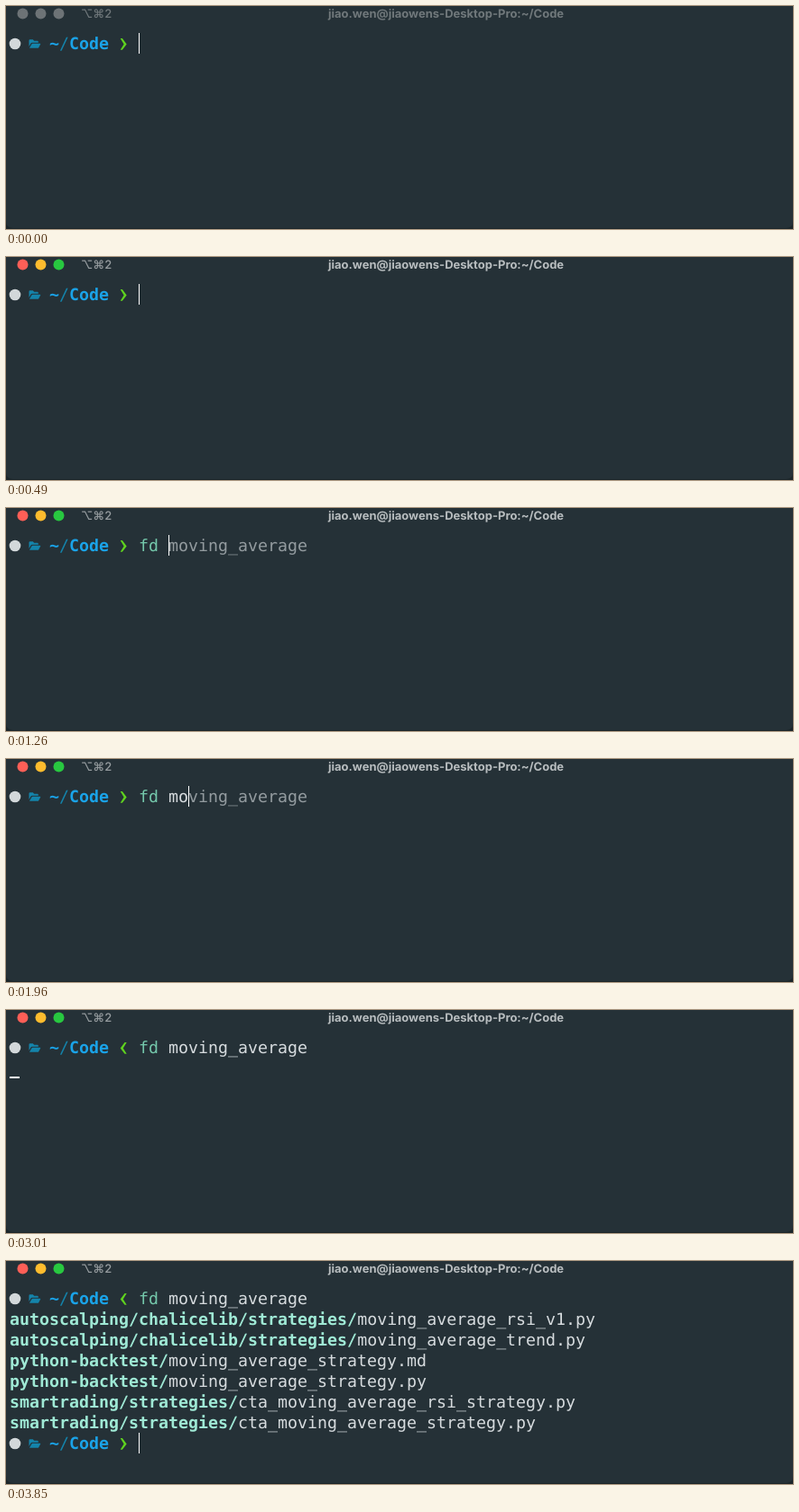
Write an HTML page that moves like this. It is 872 px wide and 248 px high and loops after 5.04 s.

```html
<!DOCTYPE html>
<html lang="en">
<head>
<meta charset="utf-8">
<title>Terminal</title>
<style>
  html, body { margin: 0; width: 100%; height: 100%; overflow: hidden; background: #1b2529; }
  svg { display: block; width: 872px; height: 248px; }
  text { white-space: pre; text-rendering: geometricPrecision; }
  .mono { font: 18.28px "DejaVu Sans Mono", monospace; }
  .bold { font-weight: 700; }
  .bar { font: 700 13px Inter, "DejaVu Sans", sans-serif; }
  .key { font-weight: 500; }
</style>
</head>
<body>
<svg id="stage" viewBox="0 0 872 248"></svg>
<script>
const LOOP = 5040;
const LEFT = 4, CELL = 11.005, TOP = 30, ROW = 23;
const INK = '#d6dbde', HINT = '#939b9f', CMD = '#74c8ab', BAD = '#ec5f67';
const DIR = '#9fe9d5', BLUE = '#1aa3e8', TEAL = '#1484ab', GREEN = '#5fd21f', WHITE = '#fff';
const PAPER = '#253137';
const COMMAND = 'fd moving_average';
const START = 13; // column after the prompt

const RESULTS = [
  ['autoscalping/chalicelib/strategies/', 'moving_average_rsi_v1.py'],
  ['autoscalping/chalicelib/strategies/', 'moving_average_trend.py'],
  ['python-backtest/', 'moving_average_strategy.md'],
  ['python-backtest/', 'moving_average_strategy.py'],
  ['smartrading/strategies/', 'cta_moving_average_rsi_strategy.py'],
  ['smartrading/strategies/', 'cta_moving_average_strategy.py'],
];

// Each step overrides part of the state before it.
const STEPS = [
  { at: 0, active: false, typed: 0, cursor: 'beam', vi: false, run: false, done: false },
  { at: 490, active: true },
  { at: 840, typed: 1 },
  { at: 1050, typed: 2 },
  { at: 1260, typed: 3 },
  { at: 1540, typed: 4 },
  { at: 1890, typed: 5 },
  { at: 2660, cursor: 'block' },
  { at: 2730, cursor: 'beam', typed: COMMAND.length },
  { at: 2940, vi: true },
  { at: 3010, run: true, cursor: 'line' },
  { at: 3080, done: true, cursor: 'beam' },
];

const colX = col => LEFT + col * CELL;
const rowY = row => TOP + row * ROW;
const rect = (x, y, w, h, fill) =>
  `<rect x="${x}" y="${y}" width="${w}" height="${h}" fill="${fill}"/>`;
const dot = (x, y, r, fill) => `<circle cx="${x}" cy="${y}" r="${r}" fill="${fill}"/>`;
const write = (col, row, str, fill, bold) => str &&
  `<text class="mono${bold ? ' bold' : ''}" x="${colX(col)}" y="${rowY(row) + 18}" fill="${fill}">${str}</text>`;

function titleBar(active) {
  const lights = active ? ['#ff5f57', '#febc2e', '#28c840'] : Array(3).fill('#6d7376');
  return lights.map((c, i) => dot(18.5 + i * 20, 8.5, 6, c)).join('') +
    `<text class="bar key" x="83" y="13.3" fill="${active ? '#979da0' : '#70787b'}">⌥⌘2</text>` +
    `<text class="bar" x="487.5" y="13.3" text-anchor="middle" fill="${active ? '#b8bdbf' : '#70787b'}">` +
    'jiao.wen@jiaowens-Desktop-Pro:~/Code</text>';
}

function prompt(row, vi) {
  const flip = vi ? ' transform="matrix(-1 0 0 1 260.4 0)"' : '';
  return dot(10, rowY(row) + 12, 6.3, '#d3d8da') +
    `<g transform="translate(0 ${row * ROW})">` +
    `<path fill="${TEAL}" d="M25.5 45V38.3q0-1 1-1h3.3l1.4 1.4h3.6q1 0 1 1v1H29q-1 0-1.5.8z` +
    `M26 46.8l2.4-4.4q.3-.6 1-.6h8.3q.9 0 .5.8l-2 3.6q-.4.6-1 .6z"/>` +
    `<path fill="${GREEN}"${flip} d="M126.7 36h2.2l4.8 6.4-4.8 6.4h-2.2l3.9-6.4z"/></g>` +
    write(4, row, '~', BLUE, true) +
    write(5, row, '/', TEAL) +
    write(6, row, 'Code', BLUE, true);
}

function commandLine({ typed }) {
  if (!typed) return '';
  const name = Math.min(typed, 2);
  return write(START, 0, COMMAND.slice(0, name), typed < 2 ? BAD : CMD) +
    write(START + name, 0, COMMAND.slice(name, typed), INK) +
    write(START + typed, 0, COMMAND.slice(typed), HINT);
}

function cursor(s) {
  const row = s.done ? RESULTS.length + 1 : s.run ? 1 : 0;
  const col = s.done ? START : s.run ? 0 : START + s.typed;
  const x = colX(col), y = rowY(row);
  if (s.cursor === 'line') return rect(x, y + 21, CELL, 2, WHITE);
  if (s.cursor === 'block')
    return rect(x, y, CELL, ROW, WHITE) + write(col, row, COMMAND[s.typed], '#111');
  return rect(Math.round(x), y, 1, ROW, WHITE);
}

const listing = () =>
  RESULTS.map(([dir, file], i) =>
    write(0, i + 1, dir, DIR, true) + write(dir.length, i + 1, file, INK)).join('') +
  prompt(RESULTS.length + 1, false);

function scene(s) {
  return `<path fill="${PAPER}" d="M0 0H872V239q0 8-8 8H8q-8 0-8-8z"/>` +
    titleBar(s.active) + prompt(0, s.vi) + commandLine(s) +
    (s.done ? listing() : '') + cursor(s);
}

const stage = document.getElementById('stage');
let shown = -1;

function update(time) {
  const t = time % LOOP;
  const count = STEPS.filter(step => step.at <= t).length;
  if (count === shown) return;
  shown = count;
  stage.innerHTML = scene(Object.assign({}, ...STEPS.slice(0, count)));
}

const begin = performance.now();
function tick() {
  update(performance.now() - begin);
  requestAnimationFrame(tick);
}
tick();
</script>
</body>
</html>
```
